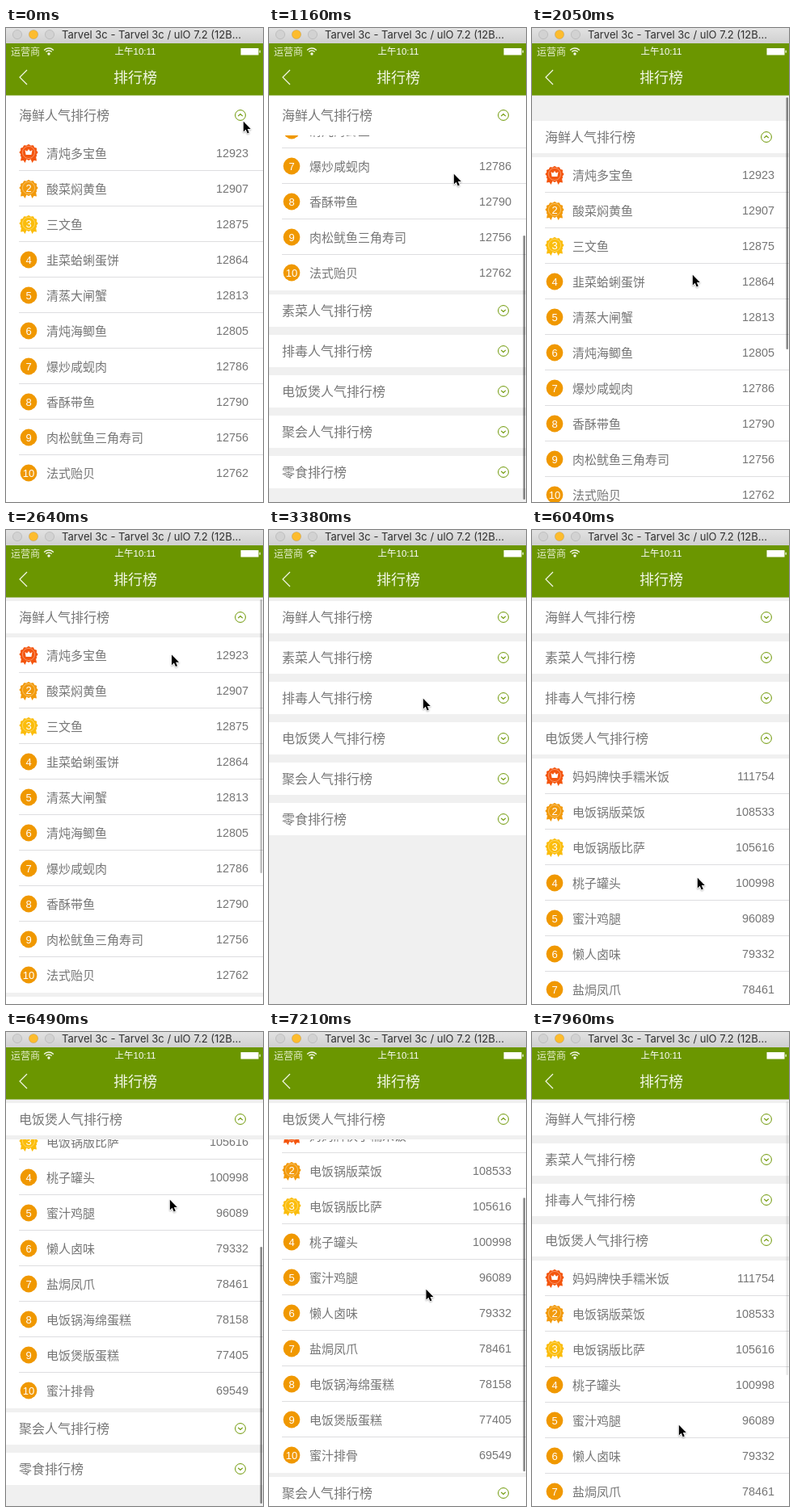
An HTML page with a canvas for the animation above (8000 ms loop, 318 by 587 pixels).

```html
<!DOCTYPE html>
<html lang="zh-CN">
<head>
<meta charset="utf-8">
<title>排行榜</title>
<style>
html, body { margin: 0; width: 100%; height: 100%; overflow: hidden; background: #f0f0f0; }
canvas { display: block; width: 318px; height: 587px; }
</style>
</head>
<body>
<canvas id="stage"></canvas>
<script>
const W = 318, H = 587, LOOP = 8000;
const TOP = 83, VIEW = H - TOP, HEAD = 50, ROW = 44;
const GREEN = '#6b9600', GREY = '#f0f0f0', INK = '#767676';
const SANS = '"Liberation Sans", "Noto Sans CJK SC", "Noto Sans CJK", sans-serif';
const HAN = '"Noto Sans CJK SC", "Noto Sans CJK", sans-serif';

const sections = [
  { title: '海鲜人气排行榜', rows: [
    ['清炖多宝鱼', 12923], ['酸菜焖黄鱼', 12907], ['三文鱼', 12875], ['韭菜蛤蜊蛋饼', 12864],
    ['清蒸大闸蟹', 12813], ['清炖海鲫鱼', 12805], ['爆炒咸蚬肉', 12786], ['香酥带鱼', 12790],
    ['肉松鱿鱼三角寿司', 12756], ['法式贻贝', 12762]] },
  { title: '素菜人气排行榜', rows: [] },
  { title: '排毒人气排行榜', rows: [] },
  { title: '电饭煲人气排行榜', rows: [
    ['妈妈牌快手糯米饭', 111754], ['电饭锅版菜饭', 108533], ['电饭锅版比萨', 105616], ['桃子罐头', 100998],
    ['蜜汁鸡腿', 96089], ['懒人卤味', 79332], ['盐焗凤爪', 78461], ['电饭锅海绵蛋糕', 78158],
    ['电饭煲版蛋糕', 77405], ['蜜汁排骨', 69549]] },
  { title: '聚会人气排行榜', rows: [] },
  { title: '零食排行榜', rows: [] }
];

// 0 to 1, smoothly, from time a to time b
function ramp(t, a, b) {
  const u = Math.min(1, Math.max(0, (t - a) / (b - a)));
  return u * u * (3 - 2 * u);
}

// The screen refreshes about every 147 ms, evenly between these marks
const marks = [0, 150, 1310, 2490, 3680, 5300, 6490, 7660, 8100];
function snap(t) {
  const i = marks.findIndex(m => m > t) - 1;
  const a = marks[i], span = marks[i + 1] - a;
  const step = span / Math.round(span / 147);
  const at = n => Math.floor((a + n * step) / 10) * 10;
  const n = Math.floor((t - a) / step);
  return at(n + 1) <= t ? at(n + 1) : at(n);
}

// Each swipe overshoots the end of the list; the last two spring back
const scrollAt = t =>
  248 * ramp(t, 730, 1160) - 275 * ramp(t, 1450, 2040) + 27 * ramp(t, 2040, 2490) +
  257 * ramp(t, 6040, 6420) - 277 * ramp(t, 6900, 7380) + 20 * ramp(t, 7380, 7700);
const barAt = t =>
  ramp(t, 730, 830) - ramp(t, 2490, 2790) + ramp(t, 6040, 6140) - ramp(t, 7750, 8030);
const openAt = t => [1 - ramp(t, 2900, 3200), 0, 0, ramp(t, 5213, 5513), 0, 0];

const stops = [[0, 293, 115], [700, 226, 420], [1160, 228, 180], [2040, 198, 305], [2800, 206, 110],
  [3380, 190, 208], [3900, 172, 361], [4400, 141, 320], [5010, 163, 263], [5300, 163, 263],
  [6040, 204, 430], [6490, 202, 207], [7950, 181, 486]];
function mouseAt(t) {
  const i = stops.findIndex(s => s[0] > t);
  if (i < 0) return stops[stops.length - 1].slice(1);
  const [t0, x0, y0] = stops[i - 1], [t1, x1, y1] = stops[i];
  const u = (t - t0) / (t1 - t0);
  return [x0 + (x1 - x0) * u, y0 + (y1 - y0) * u];
}

const canvas = document.getElementById('stage');
const c = canvas.getContext('2d');
const dpr = window.devicePixelRatio || 1;
canvas.width = W * dpr;
canvas.height = H * dpr;

function text(s, x, y, size, color, o = {}) {
  c.font = `${o.weight || 400} ${size}px ${o.font || SANS}`;
  c.textAlign = o.align || 'left';
  c.fillStyle = color;
  c.fillText(s, x, y + size * (o.drop || 0.36));
}
const han = (s, x, y, size, color, align) =>
  text(s, x, y, size, color, { font: HAN, weight: 300, drop: 0.38, align });
function box(x, y, w, h, color) {
  c.fillStyle = color;
  c.fillRect(x, y, w, h);
}
function disc(x, y, r, color) {
  c.fillStyle = color;
  c.beginPath();
  c.arc(x, y, r, 0, 7);
  c.fill();
}
function ring(x, y, r, color, width, from = 0, to = 7) {
  c.strokeStyle = color;
  c.lineWidth = width;
  c.beginPath();
  c.arc(x, y, r, from, to);
  c.stroke();
}
function path(points) {
  c.beginPath();
  points.forEach(([x, y]) => c.lineTo(x, y));
}
function line(points, color, width) {
  path(points);
  c.strokeStyle = color;
  c.lineWidth = width;
  c.stroke();
}
function shape(points, color) {
  path(points);
  c.fillStyle = color;
  c.fill();
}

function medal(rank, x, y) {
  const color = ['#f4560f', '#f29a0c', '#fbbd0c'][rank - 1];
  const edge = [];
  for (let a = 0; a < Math.PI * 2; a += 0.06) {
    const r = 10.2 + 0.6 * Math.cos(a * 12);
    edge.push([x + r * 1.06 * Math.cos(a), y - 1 + r * 0.92 * Math.sin(a)]);
  }
  for (const d of [-1, 1])
    shape([[x + d, y + 4], [x + d * 9, y + 4], [x + d * 10, y + 9.5], [x + d * 6.5, y + 9], [x + d * 4.5, y + 12]], color);
  shape(edge, color);
  ring(x, y - 1, 7.6, 'rgba(255,255,255,.45)', 0.8);
  if (rank > 1) return text(rank, x, y - 1, 13, '#fff', { align: 'center' });
  const half = [[5, -4.5], [3.6, 2.2]];
  shape([[x - 4.5, y - 4], [x - 2, y - 2.2], [x, y - 5], [x + 2, y - 2.2], [x + 4.5, y - 4], [x + 3.4, y + 2], [x - 3.4, y + 2]], '#fff');
}

function drawRow([name, score], rank, y, last) {
  const mid = y + ROW / 2;
  box(0, y, W, ROW, '#fff');
  if (!last) box(16, y + ROW - 1, W - 16, 1, '#dedee0');
  if (rank < 4) medal(rank, 28, mid);
  else {
    disc(28, mid, 10.4, '#f09800');
    text(rank, 28, mid, 13, '#fff', { align: 'center' });
  }
  han(name, 50, mid, 15, INK);
  text(score, 300, mid, 14.4, INK, { align: 'right' });
}

function drawHead(title, y, open, edge) {
  const mid = y + HEAD / 2, d = open ? -1 : 1;
  box(0, y, W, HEAD, edge);
  box(0, y + 5, W, HEAD - 10, '#fff');
  han(title, 16, mid, 16, INK);
  ring(290, mid, 6.4, GREEN, 1);
  line([[287.2, mid - 1.2 * d], [290, mid + 1.4 * d], [292.8, mid - 1.2 * d]], GREEN, 1.1);
}

function drawList(t) {
  const scroll = Math.round(scrollAt(t)), open = openAt(t);
  const heads = [];
  let at = 0;
  c.save();
  c.beginPath();
  c.rect(0, TOP, W, VIEW);
  c.clip();
  box(0, TOP, W, VIEW, GREY);
  sections.forEach((s, i) => {
    const p = open[i], body = Math.round(s.rows.length * ROW * p);
    const first = TOP + at + HEAD - scroll;
    if (p > 0) s.rows.forEach((r, n) => {
      if (p < 1 && first + n * ROW > H) return;
      c.globalAlpha = p;
      drawRow(r, n + 1, Math.round(first + n * ROW * p), n === s.rows.length - 1);
    });
    c.globalAlpha = 1;
    heads.push(TOP - scroll + Math.min(Math.max(at, scroll), at + body));
    at += HEAD + body;
  });
  sections.forEach((s, i) => {
    const plain = t < 730 || (i === 0 && t < 1310);
    // a reloading head cross-fades between its two states
    for (const state of [0, 1]) {
      c.globalAlpha = state ? open[i] : 1 - open[i];
      if (c.globalAlpha) drawHead(s.title, heads[i], state, plain ? '#fff' : GREY);
    }
  });
  drawBar(scroll, at, barAt(t));
  c.restore();
}

function drawBar(scroll, total, alpha) {
  const max = total - VIEW;
  if (alpha <= 0 || max <= 0) return;
  const full = 339, room = VIEW - 6 - full;
  const over = Math.max(0, -scroll, scroll - max);
  const y = TOP + 3 + (scroll > max ? room + over : Math.max(0, scroll) / max * room);
  c.globalAlpha = alpha;
  c.fillStyle = 'rgba(0,0,0,.47)';
  c.beginPath();
  c.roundRect(314.5, y, 2.5, full - over, 1.25);
  c.fill();
}

function drawTop() {
  const g = c.createLinearGradient(0, 0, 0, 19);
  g.addColorStop(0, '#e2e2e2');
  g.addColorStop(1, '#d0d0d0');
  box(0, 0, W, 19, g);
  box(0, 19, W, TOP - 18.5, GREEN);
  ['#d2d2d2', '#fdbc2e', '#d2d2d2'].forEach((fill, i) => {
    disc(14 + i * 20, 8, 5.6, fill);
    ring(14 + i * 20, 8, 5.6, 'rgba(0,0,0,.14)', 0.8);
  });
  text('Tarvel 3c - Tarvel 3c / ulO 7.2 (12B...', 69, 8.5, 13, '#303030', { font: 'Inter, sans-serif' });

  const pale = '#f4f8e8';
  han('运营商', 6, 29, 12, '#e4edcc');
  text('上午10:11', 160, 29, 11.5, '#fff', { align: 'center', drop: 0.37 });
  for (const r of [5, 8]) ring(53, 33, r, pale, 1.4, -Math.PI * 0.76, -Math.PI * 0.24);
  disc(53, 32, 1.7, pale);
  box(290.5, 25, 22, 8.5, '#fff');
  box(313.5, 27.7, 1.3, 3, pale);

  line([[26, 52], [17, 61], [26, 70]], pale, 1.2);
  han('排行榜', 160, 61, 18, pale, 'center');
}

function drawMouse(t) {
  const [x, y] = mouseAt(t);
  c.save();
  c.translate(x + 0.8, y + 0.8);
  c.scale(0.85, 0.85);
  path([[0, 0], [0, 15], [3.4, 11.8], [5.8, 17.2], [8.2, 16.2], [5.9, 10.9], [10.6, 10.9]]);
  c.closePath();
  c.lineJoin = 'round';
  c.shadowColor = 'rgba(0,0,0,.3)';
  c.shadowBlur = 2 * dpr;
  c.shadowOffsetY = dpr;
  c.strokeStyle = '#fff';
  c.lineWidth = 1.8;
  c.stroke();
  c.shadowColor = 'transparent';
  c.fillStyle = '#000';
  c.fill();
  c.restore();
}

const start = performance.now();
function loop() {
  const t = snap((performance.now() - start) % LOOP);
  c.setTransform(dpr, 0, 0, dpr, 0, 0);
  drawList(t);
  drawTop();
  drawMouse(t);
  requestAnimationFrame(loop);
}
loop();
</script>
</body>
</html>
```
